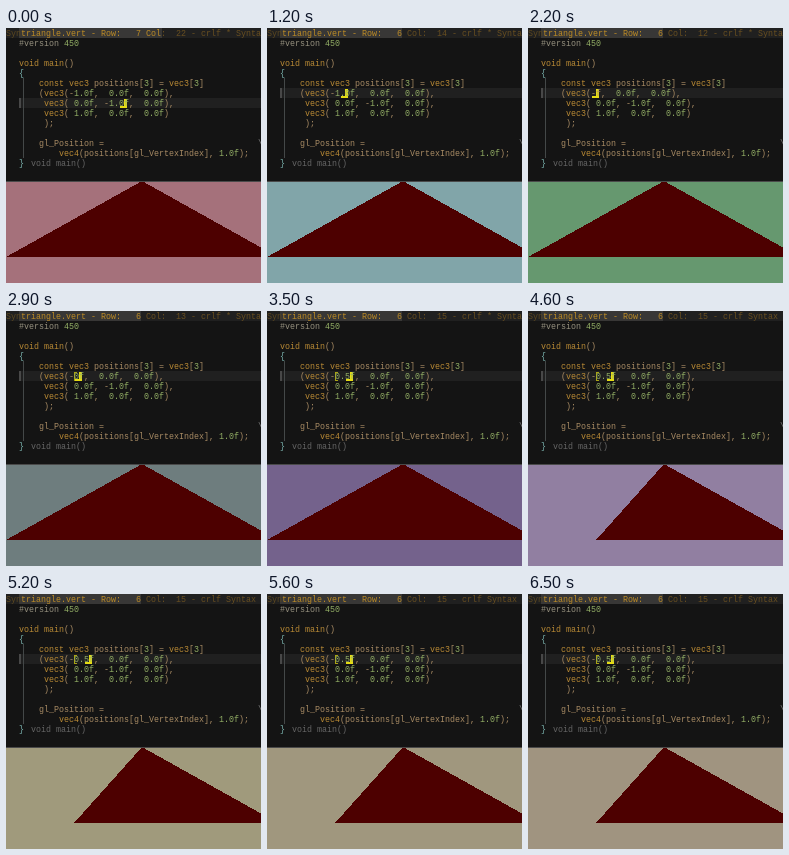
An HTML page with a canvas for the animation above (6600 ms loop, 255x255 px).

```html
<!DOCTYPE html>
<html lang="en">
<head>
<meta charset="utf-8">
<style>
html, body { margin: 0; width: 100%; height: 100%; overflow: hidden; background: #141414; }
canvas { display: block; width: 255px; height: 255px; }
</style>
</head>
<body>
<canvas id="stage" width="255" height="255"></canvas>
<script>
const ctx = document.getElementById('stage').getContext('2d');
const LOOP = 6600, LEFT = 13, CELL = 5, LINE = 10;
const VIEW_TOP = 154, APEX = 153, BASE = 229;
const TAN = '#a88b64', KEYWORD = '#b98a35', NUMBER = '#94b066', BRACE = '#7cb5b0', GRAY = '#96917f';
const YELLOW = '#e6dc14', OLIVE = '#aaa414';

// Each list holds [start time, value...]; the last entry reached applies.
const skies = [
  [0, '#a5717b'], [500, '#968b92'], [800, '#81a5a9'], [1500, '#66986f'],
  [2600, '#6e7d7e'], [3500, '#74628c'], [4000, '#827196'], [4600, '#917fa1'],
  [4900, '#988d8f'], [5200, '#a09a7c'], [5600, '#a0977e'], [6400, '#a09480']
];
const edits = [
  // time, row, column, first x coordinate
  [0, 7, 22, '-1.0f'], [1100, 6, 16, '-1.0f'], [1200, 6, 14, '-1.0f'],
  [1800, 6, 13, '-10f'], [1900, 6, 12, '-0f'], [2200, 6, 12, '-f'],
  [2900, 6, 13, '-0f'], [3000, 6, 14, '-0.f'], [3100, 6, 15, '-0.5f']
];
const MARK_TIME = 1900, SAVE_TIME = 3900, RELOAD_TIME = 4200;

const at = (list, t) => list.reduce((found, item) => item[0] <= t ? item : found);

function rect(color, x, y, w, h) {
  ctx.fillStyle = color;
  ctx.fillRect(x, y, w, h);
}

function text(str, x, row, color) {
  ctx.fillStyle = color;
  ctx.fillText(str, x, row * LINE + 8);
}

function tokenColor(word) {
  if (/^[{}]/.test(word)) return BRACE;
  if (/^\d/.test(word)) return NUMBER;
  if (/^(void|const|main|vec\d)$/.test(word)) return KEYWORD;
  return word === '#version' ? GRAY : TAN;
}

function code(str, row) {
  for (const { 0: word, index } of str.matchAll(/#?[a-z_]\w*|\d[\d.]*f?|\S/gi)) {
    text(word, LEFT + index * CELL, row, tokenColor(word));
  }
}

function drawHeader(row, col, saved) {
  const end = Math.round(LEFT + 20.4 * row);
  const label = `triangle.vert - Row:${String(row).padStart(4)} Col:${String(col).padStart(4)} - crlf ${saved ? '' : '* '}Syntax`;
  rect('#202020', 0, 0, 255, LINE);
  rect('#383736', LEFT, 0, end - LEFT, LINE);
  text('Syn', 0, 0, '#5c4820');
  for (const [x, w, color] of [[LEFT, end - LEFT, '#bd8c26'], [end, 255 - end, '#694f20']]) {
    ctx.save();
    ctx.beginPath();
    ctx.rect(x, 0, w, LINE);
    ctx.clip();
    text(label, 15, 0, color);
    ctx.restore();
  }
}

function drawMark() {
  rect(OLIVE, 68, 61, 1, 9);
  rect(OLIVE, 68, 61, 3, 1);
  rect(OLIVE, 68, 69, 3, 1);
}

function drawCursor(x, y) {
  rect(YELLOW, x, y + 1, 3, LINE - 1);
  rect(YELLOW, x - 4, y + LINE - 2, 4, 2);
}

function drawEditor(t) {
  const [, row, col, coord] = at(edits, t);
  const y = row * LINE;
  rect('#141414', 0, 0, 255, VIEW_TOP);
  rect('#4a4a4a', 0, VIEW_TOP - 1, 255, 1);
  drawHeader(row, col, t >= SAVE_TIME);
  rect('#202020', LEFT, y, 255 - LEFT, LINE);
  rect('#484848', LEFT, y, 2, LINE);
  rect('#444848', 17, 50, 1, 80);

  if (t >= MARK_TIME) drawMark();
  drawCursor(LEFT + (col - 1) * CELL, y);

  const lines = [
    '#version 450', '', 'void main()', '{',
    '    const vec3 positions[3] = vec3[3]',
    `    (vec3(${coord},  0.0f,  0.0f),`,
    '     vec3( 0.0f, -1.0f,  0.0f),',
    '     vec3( 1.0f,  0.0f,  0.0f)',
    '     );', '',
    '    gl_Position =',
    '        vec4(positions[gl_VertexIndex], 1.0f);',
    '}'
  ];
  lines.forEach((line, i) => code(line, i + 1));
  text('void main()', 25, 13, '#666666');
  text('\\', 252, 11, '#777777');
}

function drawScene(t) {
  rect(at(skies, t)[1], 0, VIEW_TOP, 255, 255 - VIEW_TOP);
  const reach = t < RELOAD_TIME ? 136 : 68;
  for (let y = VIEW_TOP; y < BASE; y++) {
    const k = (y + 0.5 - APEX) / (BASE - APEX);
    const from = Math.round(136 - k * reach);
    const to = Math.round(136 + k * 136);
    rect('#4d0000', from, y, to - from, 1);
  }
}

function frame(now) {
  const t = now % LOOP;
  ctx.font = '8.333px "Liberation Mono", monospace';
  drawEditor(t);
  drawScene(t);
  requestAnimationFrame(frame);
}
frame(performance.now());
</script>
</body>
</html>
```
